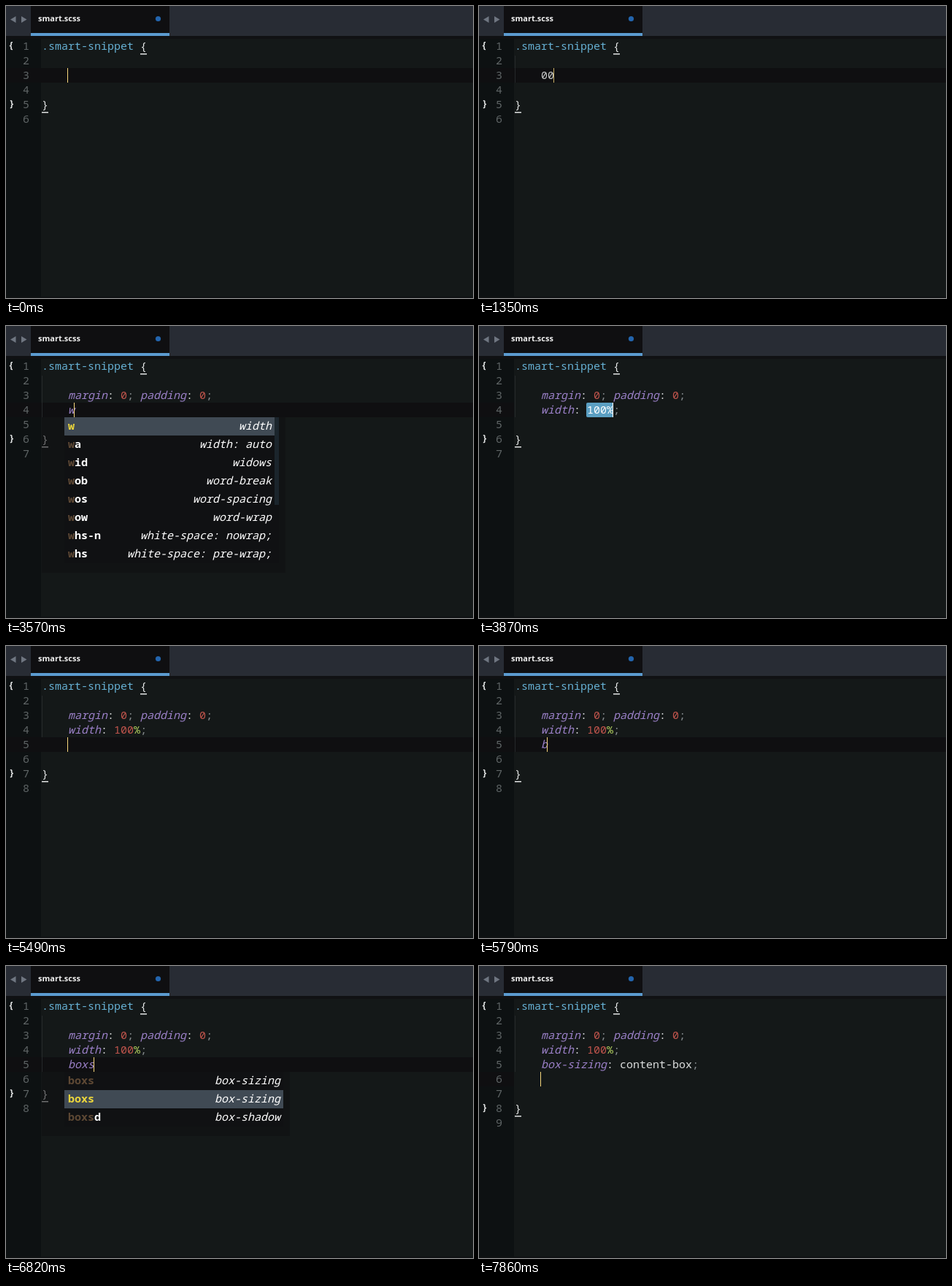
Write an HTML page with a canvas that moves like this. It is 640 px wide and 400 px high and loops after 8 s.

```html
<!DOCTYPE html>
<html lang="en">
<head>
<meta charset="utf-8">
<title>Smart snippet typing</title>
<style>
  html, body { margin: 0; width: 100%; height: 100%; overflow: hidden; background: #141818; }
  canvas { display: block; }
</style>
</head>
<body>
<canvas id="stage" width="640" height="400"></canvas>
<script>
const ctx = document.getElementById('stage').getContext('2d');
const LOOP = 8000, CHAR = 9, LINE = 20, ROW = 25, INDENT = 85, FIRST = 3;
const MONO = '15px "Noto Sans Mono", monospace';
const SMALL_MONO = '13px "Noto Sans Mono", monospace';

const MARGIN = 'margin: 0; padding: 0;';
const WIDTH = 'width: 100%;';
const SIZING = 'box-sizing: content-box;';

const widthList = {
  width: 288, thumb: 120,
  items: [
    ['w', 'width'], ['wa', 'width: auto'], ['wid', 'widows'], ['wob', 'word-break'],
    ['wos', 'word-spacing'], ['wow', 'word-wrap'], ['whs-n', 'white-space: nowrap;'],
    ['whs', 'white-space: pre-wrap;']
  ]
};
const boxItems = [['boxs', 'box-sizing'], ['boxs', 'box-sizing'], ['boxsd', 'box-shadow']];
const boxList = {
  width: 300, thumb: 133,
  items: [
    ...boxItems, ['bottom', 'bottom'], ['bds-o', 'border-style: outset;'],
    ['bdf-ow', 'border-fit: overwrite;'], ['bdf-of', 'border-fit: overflow;'],
    ['bgo', 'background-origin']
  ]
};
const shortList = { width: 300, thumb: 0, items: boxItems };

// Each step: start time, edited lines, caret opacity, other state.
const A = [MARGIN], B = [MARGIN, WIDTH], C = [...B, SIZING];
const steps = [
  [0, [''], 1], [300, [''], .45], [450, [''], 0],
  [750, ['0'], 1], [1050, ['00'], 1], [1350, ['00'], .8],
  [1490, A, 1], [1940, A, .45], [2080, A, 0],
  [2230, [...A, ''], 1], [2530, [...A, ''], .45], [2680, [...A, ''], 0],
  [3130, [...A, 'w'], 1],
  [3280, [...A, 'w'], 1, { list: widthList, query: 'w' }],
  [3720, B, 1, { selected: true, noMarks: true }],
  [3870, B, 1, { selected: true }],
  [4160, B, 1, { noMarks: true }], [4310, B, 1],
  [4600, B, .45], [4750, B, 0], [5350, B, .45],
  [5490, [...B, ''], 1], [5790, [...B, 'b'], 1],
  [5940, [...B, 'bo'], 1, { list: boxList, query: 'bo' }],
  [6080, [...B, 'box'], 1, { list: shortList, query: 'box' }],
  [6380, [...B, 'boxs'], 1, { list: shortList, query: 'box' }],
  [6530, [...B, 'boxs'], 1, { list: shortList, query: 'boxs' }],
  [6820, [...B, 'boxs'], 1, { list: shortList, query: 'boxs', active: 1 }],
  [6970, C, 1], [7270, C, .45], [7420, C, 0],
  [7860, [...C, ''], 1, { plainRow: true }]
];

function rect(color, x, y, w, h) {
  ctx.fillStyle = color;
  ctx.fillRect(x, y, w, h);
}

function text(str, x, y, color, style = '500', font = MONO) {
  ctx.font = style + ' ' + font;
  ctx.fillStyle = color;
  ctx.fillText(str, x, y);
}

function shape(color, points) {
  ctx.fillStyle = color;
  ctx.beginPath();
  points.forEach(([x, y]) => ctx.lineTo(x, y));
  ctx.fill();
}

const lineTop = line => 45 + LINE * (line - 1);
const baseline = line => lineTop(line) + 15;

function header() {
  rect('#282c34', 0, 0, 640, 41);
  rect('#101113', 0, 41, 640, 4);
  rect('#0f0f11', 34, 0, 190, 41);
  rect('#5b9bd0', 34, 37, 190, 4);
  shape('#6f7681', [[6, 18.5], [13.5, 14], [13.5, 23]]);
  shape('#6f7681', [[28.5, 18.5], [21, 14], [21, 23]]);
  text('smart.scss', 44, 21, '#f0f0f0', '600', '11px "Noto Sans", sans-serif');
  ctx.fillStyle = '#2365ae';
  ctx.beginPath();
  ctx.arc(208.5, 17.5, 3.6, 0, 7);
  ctx.fill();
}

function codeLine(str, line, selected) {
  if (!str.includes(':')) {
    const isNumber = /\d/.test(str);
    text(str, INDENT, baseline(line), isNumber ? '#c9cbcb' : '#9b80c8', isNumber ? '500' : 'italic 500');
    return;
  }
  for (const m of str.matchAll(/[a-z-]+(?=:)|\d+|%|;|:|[a-z-]+/g)) {
    const token = m[0], isProperty = str[m.index + token.length] === ':';
    let color = '#dcdede';
    if (isProperty) color = '#9b80c8';
    else if (token === ';') color = '#858b8e';
    else if (selected) color = token === ':' ? color : '#ffffff';
    else if (token === '%') color = '#b3d15f';
    else if (/\d/.test(token)) color = '#c2554d';
    text(token, INDENT + m.index * CHAR, baseline(line), color, isProperty ? 'italic 500' : '500');
  }
}

function suggestions({ list, query, active = 0 }, y) {
  const { width, thumb, items } = list, x = 80, height = items.length * ROW;
  const full = width + (thumb ? 6 : 0);
  rect('rgba(15,16,17,.55)', 49, y, x - 49 + full + 9, height + 13);
  rect('#101113', x, y, full, height);
  if (thumb) rect('#1b252c', x + width, y, 6, thumb);
  rect('#404a54', x, y + active * ROW, width, ROW);
  items.forEach(([key, label], i) => {
    const rowBase = y + i * ROW + 17;
    let found = 0;
    [...key].forEach((c, k) => {
      const hit = c === query[found];
      if (hit) found++;
      const color = !hit ? '#ffffff' : i === active ? '#ead53c' : '#5d4834';
      text(c, INDENT + k * CHAR, rowBase, color, '600');
    });
    text(label, x + width - 4 - label.length * CHAR, rowBase, '#ffffff', 'italic 500');
  });
}

function draw(now) {
  const t = now % LOOP;
  const [, lines, caret, state = {}] = steps.findLast(step => step[0] <= t);
  const current = FIRST + lines.length - 1, close = current + 2;
  const typed = lines[lines.length - 1];

  rect('#141818', 0, 0, 640, 400);
  rect('#0d1112', 0, 41, 48, 359);
  header();
  rect('#0f0f11', 0, lineTop(current), state.selected || state.plainRow ? 48 : 640, LINE);
  rect('#0f1213', 0, 398, 640, 2);

  for (let n = 1; n <= close + 1; n++) text(n, 23, baseline(n), '#5f6566');
  text('{', 3, baseline(1) - 2, '#e0e2e2', '600', SMALL_MONO);
  text('}', 4, baseline(close) - 2, '#e0e2e2', '600', SMALL_MONO);

  const guideEnd = lineTop(typed ? current + 1 : current);
  if (lines[0]) rect('#25292a', 49, 68, 1, guideEnd - 68);

  text('.smart-snippet', 49, baseline(1), '#66b0d3');
  text('{', 184, baseline(1), '#e2e4e4');
  text('}', 49, baseline(close), '#e2e4e4');
  if (!state.noMarks) {
    rect('#e2e4e4', 184, baseline(1) + 5, 9, 1.5);
    rect('#e2e4e4', 49, baseline(close) + 5, 9, 1.5);
  }

  if (state.selected) {
    ctx.fillStyle = '#5b9fc2';
    ctx.beginPath();
    ctx.roundRect(147, lineTop(current), 37, LINE, 2);
    ctx.fill();
  }
  lines.forEach((str, i) => codeLine(str, FIRST + i, state.selected && i === lines.length - 1));

  const column = typed.length - (state.selected ? 1 : 0);
  ctx.globalAlpha = caret;
  rect(state.selected ? '#ffffff' : '#f6d77c', INDENT - 1 + column * CHAR, lineTop(current), 1, LINE);
  ctx.globalAlpha = 1;

  if (state.list) suggestions(state, lineTop(current + 1));
  requestAnimationFrame(() => draw(performance.now()));
}

draw(performance.now());
</script>
</body>
</html>
```
